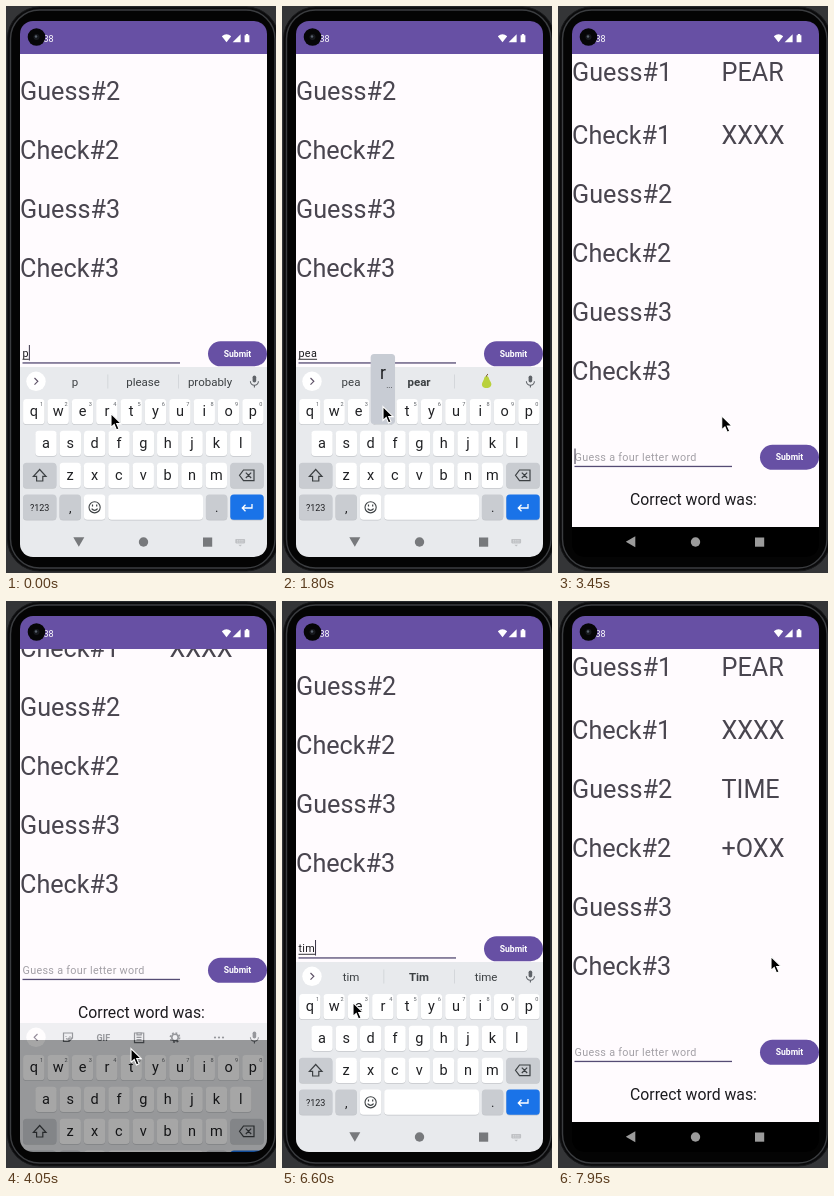
Animation of 270 by 567 pixels, one loop 8000 ms. Source, as an HTML page:

```html
<!DOCTYPE html>
<html lang="en">
<head>
<meta charset="utf-8">
<title>Word guessing app</title>
<style>
html, body { margin: 0; width: 100%; height: 100%; overflow: hidden; background: #303133; }
svg { display: block; width: 100vw; height: 100vh; font-family: Roboto, sans-serif; }
text { white-space: pre; }
</style>
</head>
<body>
<svg id="stage" viewBox="0 0 270 567" preserveAspectRatio="none">
  <defs>
    <clipPath id="screen"><rect x="14" y="15" width="247" height="536" rx="13"/></clipPath>
    <clipPath id="page"><rect x="14" y="48" width="247" height="503"/></clipPath>
  </defs>
  <rect width="270" height="567" fill="#343537"/>
  <rect x="1.5" y="1" width="271" height="564" rx="32" fill="#0b0b0c" stroke="#17181a"/>
  <rect x="4.5" y="4" width="264.5" height="558" rx="29" fill="#040404" stroke="#3b3d40" stroke-width="1.4"/>
  <g clip-path="url(#screen)">
    <rect x="14" y="15" width="247" height="536" fill="#000"/>
    <g clip-path="url(#page)">
      <g id="content"></g>
    </g>
    <g id="keyboard"></g>
    <g id="nav">
      <path id="back" d="M-5.500 -4.500H5.500L0 5Z"/>
      <circle cx="137.500" cy="536" r="4.700"/>
      <rect x="197" y="531.500" width="9.200" height="9.200"/>
      <g id="imeIcon" fill="#bfc1c4">
        <rect x="229.300" y="533" width="9.800" height="4.400" rx=".8"/>
        <path d="M232.400 538.700h3.600l-1.800 1.800z"/>
        <path d="M231 534.400h6.500M231 536h6.500" stroke="#e8eaed" stroke-width=".6" stroke-dasharray="1 .8"/>
      </g>
    </g>
    <rect x="14" y="15" width="247" height="33" fill="#6750a4"/>
    <text x="47.600" y="35.800" font-size="9" text-anchor="end" fill="#fff">9:38</text>
    <g fill="#fff">
      <path d="M215.800 30.200Q220.500 26.300 225.200 30.200L220.500 36.200Z"/>
      <path d="M234.600 28.200V36.200H226.600Z"/>
      <path d="M238.600 29.200h1.200v-1.200h2.400v1.200h1.200v7h-4.800z"/>
    </g>
  </g>
  <circle cx="30.500" cy="31" r="8.800" fill="#060607"/>
  <circle cx="30.500" cy="31" r="3" fill="#17191d"/>
  <circle cx="30" cy="30.500" r="1.200" fill="#59616c"/>
  <path id="mouse" d="M0 0V14L3.200 11L5.500 16.400L8 15.300L5.700 10.100H10.200Z" fill="#000" stroke="#fff" stroke-width="1.100"/>
</svg>
<script>
const $ = id => document.getElementById(id);
const STEP = 150, LOOP = 8000;

function add(parent, tag, attrs, text) {
  const el = document.createElementNS("http://www.w3.org/2000/svg", tag);
  for (const k in attrs) el.setAttribute(k, attrs[k]);
  if (text !== undefined) el.textContent = text;
  parent.appendChild(el);
  return el;
}
const set = (el, attrs) => { for (const k in attrs) el.setAttribute(k, attrs[k]); };
const show = (el, on) => el.setAttribute("visibility", on ? "inherit" : "hidden");
const label = (parent, x, y, size, fill, text, more) =>
  add(parent, "text", { x, y, "font-size": size, fill, ...more }, text);
const box = (parent, x, y, width, height, rx, fill) =>
  add(parent, "rect", { x, y, width, height, rx, fill });
const line = (parent, d, stroke = "#5f6368", width = 1.2) =>
  add(parent, "path", { d, fill: "none", stroke, "stroke-width": width });
const mid = { "text-anchor": "middle" };

// Page: its lower edge moves with the content
const content = $("content");
box(content, 14, -130, 247, 547.5, 0, "#fffbfe");
const rows = [-28.5, 34.5, 93.5, 152.5, 211.5, 270.5];
rows.forEach((y, i) =>
  label(content, 14, y, 25.2, "#49454f", (i % 2 ? "Check#" : "Guess#") + ((i >> 1) + 1)));
const answers = ["PEAR", "XXXX", "TIME", "+OXX"].map((s, i) =>
  label(content, 163.5, rows[i], 25.2, "#49454f", s));
const field = { "letter-spacing": .3 };
const hint = label(content, 16.5, 351.4, 10.8, "#a3a0a6", "Guess a four letter word", field);
const typed = label(content, 16.5, 351.4, 10.8, "#1c1b1f", "", field);
const compose = box(content, 16.5, 352.8, 0, .9, 0, "#1c1b1f");
const caret = box(content, 16.5, 339, 1, 15.5, 0, "#3b3547");
box(content, 16.5, 356.3, 157.5, 1.3, 0, "#554b74");
const button = box(content, 202, 335.3, 59, 25, 12.5, "#6750a4");
label(content, 231.5, 350.9, 8.6, "#fff", "Submit", { ...mid, "font-weight": 600 });
label(content, 72, 395, 15.8, "#1c1b1f", "Correct word was:");

// Keyboard
const kb = $("keyboard"), keys = {};
const GREY = "#c9ccd1", INK = "#202124", PITCH = 24.35;
box(kb, 14, 361, 247, 200, 0, "#e8eaed");
add(kb, "circle", { cx: 30, cy: 375.3, r: 9.7, fill: "#fff" });
const chevron = line(kb, "", "#5f5368");
const mic = add(kb, "g", {});
box(mic, 246.6, 369.5, 3.6, 7, 1.8, "#5f6368");
line(mic, "M244.400 375.200a4 4 0 0 0 8 0M248.400 379v2.500", "#5f6368", 1.1);

const strip = add(kb, "g", {});
line(strip, "M101.800 368.500v14M172.500 368.500v14", "#cfd2d6", .8);
const words = [69, 137, 204].map(x => label(strip, x, 380, 11.5, "#3c4043", "", mid));
const pear = add(strip, "g", {});
add(pear, "path", { d: "M204.500 370C207 370 206.700 373 208.300 375.200C211 379 208.500 382 204.500 382S198.500 379 201 375.200C202.600 373 202 370 204.500 370Z", fill: "#b9d13c" });
line(pear, "M204.500 370.500Q204.500 368.800 206 368", "#7a5530", 1);

const tools = add(kb, "g", {});
line(tools, "M57.500 371h9v5l-3.500 3.500h-5.500zM66.500 376h-3.500v3.500M60 374v.8M64 374v.8M60 376.600q1.500 1 2.600 0");
label(tools, 97.3, 378.6, 9, "#5f6368", "GIF", { ...mid, "font-weight": 700 });
line(tools, "M128.500 371h9.200v9.700h-9.200zM131 370.800h4.200v2h-4.200zM130.500 375.300h5M130.500 377.700h5");
add(tools, "circle", { cx: 169, cy: 375.5, r: 3.2, fill: "none", stroke: "#5f6368", "stroke-width": 1.6 });
add(tools, "circle", { cx: 169, cy: 375.5, r: 4.6, fill: "none", stroke: "#5f6368", "stroke-width": 1.6, "stroke-dasharray": "1.8 1.81" });
[209, 213, 217].forEach(cx => add(tools, "circle", { cx, cy: 375.5, r: 1.1, fill: "#5f6368" }));

function key(x, y, w, fill) {
  box(kb, x, y + .8, w, 25.3, 3.5, "#c3c6ca");
  box(kb, x, y, w, 25.3, 3.5, fill);
}
[["qwertyuiop", 27.8, 393], ["asdfghjkl", 40, 424.7], ["zxcvbnm", 64.2, 456.7]].forEach(([row, x0, y], r) => {
  [...row].forEach((c, i) => {
    const x = x0 + i * PITCH;
    key(x - 10.7, y, 21.4, "#fff");
    label(kb, x, y + 16.8, 14.5, INK, c, mid);
    if (!r) label(kb, x + 7.9, y + 6.8, 5.6, "#5f6368", (i + 1) % 10, mid);
    keys[c] = { x, y };
  });
});
key(17, 456.7, 33.4, GREY);
line(kb, "M33.700 463.500L40 470.300H36.800V475H30.600V470.300H27.400Z", "#3c4043");
key(224.3, 456.7, 33.4, GREY);
line(kb, "M233.500 469.300L237.500 464H248V474.600H237.500ZM239.800 466.600l5.400 5.400M245.200 466.600l-5.400 5.400", "#3c4043");
key(17, 488.5, 33.4, GREY);
label(kb, 33.7, 505, 9, INK, "?123", mid);
key(53.5, 488.5, 21.4, GREY);
label(kb, 64.2, 506, 13, INK, ",", mid);
key(77.9, 488.5, 21.4, "#fff");
add(kb, "circle", { cx: 88.6, cy: 501.3, r: 5.6, fill: "none", stroke: "#3c4043", "stroke-width": 1.1 });
line(kb, "M86.500 498.600v1.800M90.700 498.600v1.800M85.600 502.700q3 3.400 6 0", "#3c4043");
key(102.2, 488.5, 94.8, "#fff");
key(199.9, 488.5, 21.4, GREY);
label(kb, 210.6, 505.5, 13, INK, ".", mid);
key(224.3, 488.5, 33.4, "#1a73e8");
line(kb, "M246 498v4H236.500M239.500 498.800L236.300 502L239.500 505.200", "#fff", 1.3);

const popup = add(kb, "g", {});
box(popup, -12.2, -45, 24.4, 70, 3.5, "#c8ccd4");
const popLetter = label(popup, 0, -20.5, 17.5, INK, "", mid);
label(popup, 6.5, -11, 8, INK, "...", mid);

// Timeline, counted in steps
const path = [
  [0, 105, 407], [2, 78, 402], [4, 77, 402], [7, 38, 438], [8, 38, 438], [11, 99, 401], [12, 101, 400],
  [13, 101, 400], [16, 235, 340], [20, 235, 340], [25, 125, 447], [28, 125, 447], [31, 125, 405],
  [33, 125, 405], [35, 190, 403], [36, 195, 403], [37, 201, 446], [38, 201, 446], [39, 206, 462],
  [40, 206, 462], [44, 71, 401], [46, 72, 401], [49, 213, 355], [53, 213, 355]
];
const typing = [
  [0, "p", "p", "please", "probably"],
  [4, "pe", "pe", "people", "per"],
  [9, "pea", "pea", "*pear", "🍐"],
  [13, "pear", "pear", "pears", "🍐"],
  [17, ""],
  [33, "t", "t", "time", "the"],
  [37, "ti", "ti", "time", "to"],
  [40, "tim", "tim", "*Tim", "time"],
  [46, "time", "time", "times", "timer"],
  [50, ""]
];
const presses = { 3: "e", 8: "a", 12: "r", 32: "t", 36: "i", 45: "e" };
const caretOff = [11, 12, 27, 53];
// step, page shift, keyboard shift, keyboard opacity
const layout = [
  [0, 0, 0, 1], [18, 99, 98, .15], [19, 103.5, 160, 0],
  [27, 21.5, 61, .65], [28, 0, 0, 1], [51, 103.5, 103, .08], [52, 103.5, 160, 0]
];
const latest = (list, n) => list.filter(e => e[0] <= n).pop();

function pointer(n) {
  const a = latest(path, n), b = path[path.indexOf(a) + 1] || a;
  const u = a === b ? 0 : (n - a[0]) / (b[0] - a[0]), e = u * u * (3 - 2 * u);
  return [a[1] + (b[1] - a[1]) * e, a[2] + .5 + (b[2] - a[2]) * e];
}

function draw(ms) {
  const n = Math.floor(ms / STEP);
  const [, shift, drop, alpha] = latest(layout, n);
  const [, text, ...picks] = latest(typing, n);

  set(content, { transform: `translate(0 ${shift})` });
  answers.forEach((el, i) => show(el, n >= (i < 2 ? 17 : 50)));
  typed.textContent = text;
  const w = text ? typed.getComputedTextLength() : 0;
  set(compose, { width: w });
  set(caret, { x: 16.5 + w });
  show(hint, !text);
  show(caret, !caretOff.includes(n));
  set(button, { fill: [17, 18, 50, 51].includes(n) ? "#7864b0" : "#6750a4" });

  set(kb, { transform: `translate(0 ${drop})`, opacity: alpha });
  const icons = n >= 27 && n < 33;
  show(tools, icons);
  show(strip, picks.length);
  set(chevron, { d: icons ? "M31.500 372l-3.300 3.300l3.300 3.300" : "M28.500 372l3.300 3.300l-3.300 3.300" });
  words.forEach((el, i) => {
    const s = picks[i] || "", bold = s[0] === "*";
    el.textContent = s === "🍐" ? "" : s.slice(bold ? 1 : 0);
    set(el, { "font-weight": bold ? 700 : 400 });
  });
  show(pear, picks[2] === "🍐");
  const down = presses[n];
  show(popup, down);
  if (down) {
    popLetter.textContent = down;
    set(popup, { transform: `translate(${keys[down].x} ${keys[down].y})` });
  }

  const up = alpha === 1;
  show($("nav"), n !== 27);
  show($("imeIcon"), up);
  set($("nav"), { fill: up ? "#77797c" : n === 18 ? "#b5b5b5" : "#9b9b9b" });
  set($("back"), { transform: `translate(72.800 535.800) rotate(${up ? 0 : n === 18 ? 78 : 90})` });
  set($("mouse"), { transform: `translate(${pointer(n)})` });
}

const start = performance.now();
function tick() {
  draw((performance.now() - start) % LOOP);
  requestAnimationFrame(tick);
}
tick();
</script>
</body>
</html>
```
